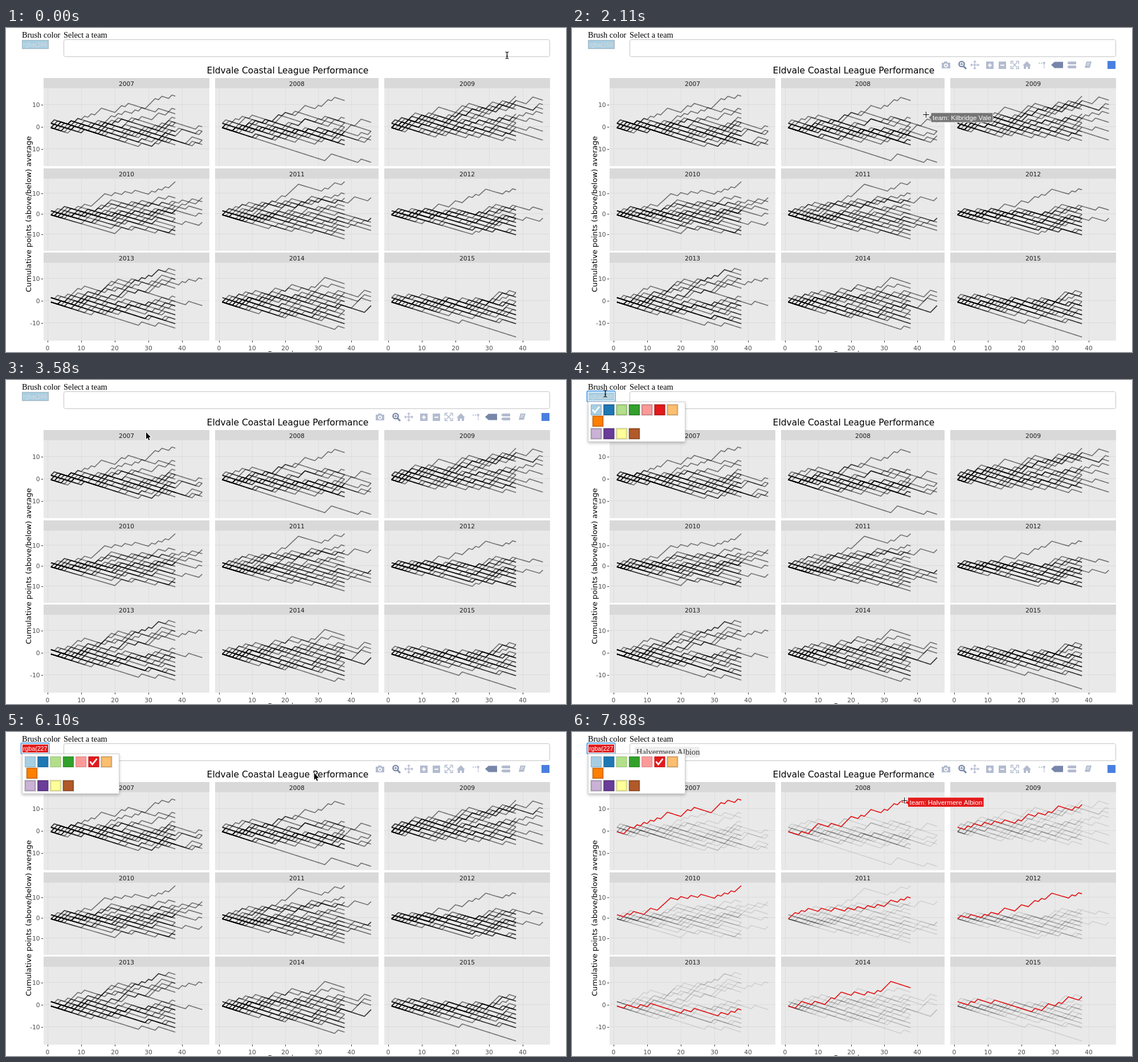
These frames come from a looping animation (983x570 px, 8 s). An HTML page with a canvas:

```html
<!DOCTYPE html>
<html lang="en">
<head>
<meta charset="utf-8">
<title>League performance</title>
<style>
html, body { margin: 0; width: 100%; height: 100%; overflow: hidden; background: #fff; }
canvas { display: block; }
</style>
</head>
<body>
<canvas id="stage" width="983" height="570"></canvas>
<script>
const W = 983, H = 570, LOOP = 8000;
const g = document.getElementById('stage').getContext('2d');
const SANS = '"DejaVu Sans", sans-serif';
const ARIAL = '"Liberation Sans", Arial, sans-serif';
const SERIF = '"Liberation Serif", Times, serif';
const RED = '#e31a1c', CLUB = 'Halvermere Albion';

const cols = [
  { x: 66, w: 291, x0: 73, dx: 5.9 },
  { x: 367, w: 287, x0: 374, dx: 5.8 },
  { x: 664, w: 291, x0: 671, dx: 5.9 }
];
const rows = [
  { y: 88, h: 155, y0: 173.5, dy: 3.9 },
  { y: 247, h: 145, y0: 327, dy: 3.6 },
  { y: 395, h: 155, y0: 480.3, dy: 3.9 }
];

// Rounds won by the brushed club, season by season.
const won = [
  [4, 5, 7, 9, 11, 13, 15, 16, 21, 22, 24, 30, 31, 32, 34, 37],
  [5, 8, 9, 10, 14, 18, 19, 20, 23, 25, 26, 30, 32, 33, 35],
  [1, 4, 6, 9, 12, 15, 19, 21, 22, 25, 28, 30, 31, 36, 38],
  [1, 4, 6, 10, 11, 14, 15, 16, 17, 20, 23, 26, 31, 33, 35, 37, 38],
  [2, 3, 5, 7, 11, 15, 19, 22, 25, 28, 31, 32, 35, 37],
  [2, 5, 9, 11, 14, 15, 19, 20, 23, 24, 26, 28, 29, 35, 37],
  [4, 8, 11, 21, 24, 32, 35, 37],
  [4, 5, 9, 13, 14, 16, 17, 21, 25, 28, 30, 31, 32],
  [1, 5, 7, 12, 24, 27, 28, 31, 33, 34, 38]
];
// Win totals of the other clubs: even spread, extra leaders, 46-round clubs.
const field = [
  { hi: 12, lo: 5, n: 12, top: [13], long: [11, 10, 10, 8, 8, 7] },
  { hi: 11, lo: 5, n: 13, top: [], long: [12, 10, 10, 9, 8] },
  { hi: 14, lo: 6, n: 11, top: [16], long: [17, 16, 15, 14, 12, 10, 8] },
  { hi: 13, lo: 4, n: 14, top: [], long: [15, 14, 12, 11, 9] },
  { hi: 13, lo: 3, n: 12, top: [17], long: [15, 10, 10, 9, 8, 7] },
  { hi: 11, lo: 4, n: 17, top: [], long: [12, 10] },
  { hi: 10, lo: 3, n: 12, top: [16, 15, 14, 14, 12], long: [16, 10] },
  { hi: 11, lo: 3, n: 13, top: [12], long: [13, 12, 11, 10, 10] },
  { hi: 11, lo: 4, n: 17, top: [], long: [] }
];

let seed = 2007;
function rnd() {
  seed = (seed + 0x6D2B79F5) | 0;
  let t = Math.imul(seed ^ (seed >>> 15), 1 | seed);
  t = (t + Math.imul(t ^ (t >>> 7), 61 | t)) ^ t;
  return ((t ^ (t >>> 14)) >>> 0) / 4294967296;
}

// A random season with a fixed number of wins.
function season(total, games) {
  const wins = [];
  for (let i = 1; i <= games; i++) {
    const left = total - wins.length, rest = games - i + 1;
    const drift = total * i / games - wins.length;
    const p = left >= rest ? 1 : left <= 0 ? 0 : left / rest + 0.08 * (drift - 0.4);
    if (rnd() < p) wins.push(i);
  }
  return { wins, games };
}

const panels = field.map((f, i) => {
  const teams = [];
  for (let k = 0; k < f.n; k++) {
    teams.push(season(Math.round(f.hi + (f.lo - f.hi) * Math.pow(k / (f.n - 1), 0.85)), 38));
  }
  f.top.forEach(w => teams.push(season(w, 38)));
  f.long.forEach(w => teams.push(season(w, 46)));
  return { col: cols[i % 3], row: rows[Math.floor(i / 3)], year: 2007 + i, teams, own: { wins: won[i], games: 38 } };
});
panels[1].teams.push({ wins: [33, 34, 43], games: 46 });
panels[8].teams.push({ wins: [22], games: 38 });

function text(c, s, x, y, size, family, color, align) {
  c.font = size + 'px ' + family;
  c.fillStyle = color;
  c.textAlign = align || 'left';
  c.fillText(s, x, y);
}
function box(c, x, y, w, h, color) {
  c.fillStyle = color;
  c.fillRect(x, y, w, h);
}
function line(c, pts, color, width) {
  c.beginPath();
  pts.forEach(p => c.lineTo(p[0], p[1]));
  c.strokeStyle = color;
  c.lineWidth = width;
  c.stroke();
}
function shape(c, pts, color) {
  c.beginPath();
  pts.forEach(p => c.lineTo(p[0], p[1]));
  c.closePath();
  c.fillStyle = color;
  c.fill();
}

function drawTeam(c, p, team, color, width) {
  const pts = [];
  let v = 0;
  for (let i = 1; i <= team.games; i++) {
    v += team.wins.includes(i) ? 1.52 : -0.48;
    pts.push([p.col.x0 + i * p.col.dx, p.row.y0 - v * p.row.dy]);
  }
  line(c, pts, color, width);
}

function drawPanel(c, p, brushed) {
  const { col, row } = p;
  box(c, col.x, row.y, col.w, 18, '#d9d9d9');
  box(c, col.x, row.y + 18, col.w, row.h - 18, '#e9e9e9');
  text(c, p.year, col.x + col.w / 2, row.y + 14, 10.7, SANS, '#1a1a1a', 'center');
  for (let k = 0; k <= 4; k++) {
    const x = Math.round(col.x0 + 10 * k * col.dx);
    box(c, x, row.y + 18, 1, row.h - 18, '#dedede');
  }
  for (const v of [10, 0, -10]) box(c, col.x, Math.round(row.y0 - v * row.dy) - 1, col.w, 1, '#dbdbdb');
  const ink = brushed ? 'rgba(0,0,0,.1)' : 'rgba(0,0,0,.5)';
  p.teams.forEach(t => drawTeam(c, p, t, ink, 1.7));
  drawTeam(c, p, p.own, brushed ? RED : ink, 1.7);
}

function chart(brushed) {
  const cv = document.createElement('canvas');
  cv.width = W;
  cv.height = H;
  const c = cv.getContext('2d');
  c.lineJoin = 'round';
  box(c, 0, 0, W, H, '#fff');
  panels.forEach(p => drawPanel(c, p, brushed));
  rows.forEach(r => [10, 0, -10].forEach(v => {
    const y = r.y0 - v * r.dy;
    text(c, v, 59.5, y + 4, 10.7, SANS, '#4d4d4d', 'right');
    box(c, 62, Math.round(y), 3, 1, '#333');
  }));
  cols.forEach(k => [0, 10, 20, 30, 40].forEach(v => {
    const x = k.x0 + v * k.dx;
    text(c, v, x, 567, 10.7, SANS, '#4d4d4d', 'center');
    box(c, Math.round(x), 550, 1, 3, '#333');
  }));
  text(c, 'Eldvale Coastal League Performance', 494.5, 80, 15.5, SANS, '#000', 'center');
  text(c, 'Game in season', 510.5, 578, 13.1, SANS, '#000', 'center');
  c.save();
  c.translate(44, 327.5);
  c.rotate(-Math.PI / 2);
  text(c, 'Cumulative points (above/below) average', 0, 0, 13.1, SANS, '#000', 'center');
  c.restore();
  text(c, 'Brush color', 28, 17, 14.35, SERIF, '#000');
  text(c, 'Select a team', 101, 17, 14.4, SERIF, '#000');
  return cv;
}
const plain = chart(false), brushed = chart(true);

function drawModebar() {
  const pale = '#b3bbcf', dark = '#7786a8';
  // camera
  box(g, 649, 61, 15, 10, pale);
  box(g, 653, 59, 6, 2, pale);
  ring(656.5, 66, 2.6, '#fff', 1.6);
  // zoom
  ring(684, 63.5, 4.6, dark, 2.4);
  line(g, [[687, 67], [692, 72]], dark, 2.8);
  line(g, [[681.5, 63.5], [686.5, 63.5]], dark, 1.2);
  line(g, [[684, 61], [684, 66]], dark, 1.2);
  // pan
  line(g, [[700, 65], [714, 65]], pale, 1.5);
  line(g, [[707, 58], [707, 72]], pale, 1.5);
  for (let k = 0; k < 4; k++) {
    const a = k * Math.PI / 2, dx = Math.cos(a), dy = Math.sin(a);
    shape(g, [[707 + 8 * dx, 65 + 8 * dy], [707 + 5 * dx - 3 * dy, 65 + 5 * dy + 3 * dx], [707 + 5 * dx + 3 * dy, 65 + 5 * dy - 3 * dx]], pale);
  }
  // zoom in and out
  for (const x of [727, 749]) {
    box(g, x, 59, 13, 13, pale);
    box(g, x + 3, 64.5, 7, 2, '#fff');
  }
  box(g, 732.5, 62, 2, 7, '#fff');
  // autoscale
  line(g, [[772, 60], [782, 70]], pale, 1.5);
  line(g, [[782, 60], [772, 70]], pale, 1.5);
  for (const [x, y, a, b] of [[770.5, 58.5, 1, 1], [784, 58.5, -1, 1], [770.5, 71.5, 1, -1], [784, 71.5, -1, -1]]) {
    line(g, [[x + 5 * a, y], [x, y], [x, y + 5 * b]], pale, 1.5);
  }
  // home
  shape(g, [[791, 66], [798.5, 58.5], [806, 66], [804, 66], [804, 72], [800, 72], [800, 68], [797, 68], [797, 72], [793, 72], [793, 66]], pale);
  // spikes
  for (const x of [819, 823, 827]) box(g, x, 61, 2.5, 1.5, pale);
  for (const y of [64, 68]) box(g, 828, y, 1.5, 2.5, pale);
  g.beginPath();
  g.arc(828.7, 61.5, 2, 0, 7);
  g.fill();
  // hover modes
  shape(g, [[841, 65], [847, 59.5], [862, 59.5], [862, 70.5], [847, 70.5]], dark);
  for (const y of [59, 66]) shape(g, [[869, y + 2.5], [872, y], [885, y], [885, y + 5], [872, y + 5]], pale);
  // book
  shape(g, [[903, 59], [912, 59], [909, 70], [900, 70]], pale);
  line(g, [[904, 62], [909, 62]], '#fff', 1);
  line(g, [[903, 65], [908, 65]], '#fff', 1);
  box(g, 940, 58, 14, 14, '#4a7fe0');
}
function ring(x, y, r, color, width) {
  g.beginPath();
  g.arc(x, y, r, 0, Math.PI * 2);
  g.strokeStyle = color;
  g.lineWidth = width;
  g.stroke();
}

const swatches = ['#a6cee3', '#1f78b4', '#b2df8a', '#33a02c', '#fb9a99', RED, '#fdbf6f', '#ff7f00', '#cab2d6', '#6a3d9a', '#ffff99', '#b15928'];
function drawPicker(active) {
  g.save();
  g.shadowColor = 'rgba(0,0,0,.25)';
  g.shadowBlur = 5;
  g.shadowOffsetY = 2;
  box(g, 28, 38, 171, 71, '#fff');
  g.restore();
  g.strokeStyle = '#d0d0d0';
  g.lineWidth = 1;
  g.strokeRect(28.5, 38.5, 170, 70);
  swatches.forEach((color, i) => {
    const x = i === 7 ? 36 : 33 + 22.3 * (i < 7 ? i : i - 8);
    const y = i < 7 ? 43 : i === 7 ? 63 : 85;
    box(g, x, y, 19, 19, color);
    g.strokeStyle = 'rgba(0,0,0,.15)';
    g.strokeRect(x + 0.5, y + 0.5, 18, 18);
    if (i === active) line(g, [[x + 3, y + 9], [x + 7, y + 14], [x + 15, y + 4]], '#fff', 2.8);
  });
}

function drawInputs(t) {
  const red = t >= 5350, focus = t >= 4320;
  g.beginPath();
  g.roundRect(101.5, 20.5, 853, 30, 3);
  g.fillStyle = '#fff';
  g.fill();
  g.strokeStyle = '#c4c4c4';
  g.lineWidth = 1;
  g.stroke();
  if (t >= 7880) {
    g.beginPath();
    g.roundRect(110, 26, 114, 19, 3);
    g.fillStyle = '#eee';
    g.fill();
    text(g, CLUB, 113, 40, 14.4, SERIF, '#333');
  }
  if (focus) {
    g.beginPath();
    g.roundRect(26.5, 19.5, 49, 19, 2);
    g.strokeStyle = '#6fb0ea';
    g.lineWidth = 2.5;
    g.stroke();
  }
  box(g, 28, 21, 47, 16, '#fff');
  box(g, 29, 22, 45, 14, red ? RED : '#a6cee3');
  if (!focus) {
    g.strokeStyle = '#a9b4bb';
    g.lineWidth = 1;
    g.strokeRect(28.5, 21.5, 46, 15);
  }
  g.save();
  g.beginPath();
  g.rect(29, 21, 44, 16);
  g.clip();
  text(g, red ? 'rgba(227, 26, 28, 1)' : 'rgba(166, 206, 227, 1)', 30, 33, 10.6, ARIAL, red ? '#fff' : '#dcdcd8');
  g.restore();
}

function drawTip(x, y, name, color) {
  const s = 'team: ' + name;
  g.font = '11.6px ' + ARIAL;
  const r = x + 10 + g.measureText(s).width;
  const pts = [[x, y], [x + 4, y - 4], [x + 4, y - 8.5], [r, y - 8.5], [r, y + 8.5], [x + 4, y + 8.5], [x + 4, y + 4], [x, y]];
  shape(g, pts, color);
  line(g, pts, '#fff', 0.8);
  text(g, s, x + 7, y + 4, 11.6, ARIAL, '#fff');
}

// Pointer path: time, x, y
const path = [
  [150, 879, 48], [760, 735, 80], [1220, 605, 114], [1370, 601, 122], [1670, 601, 122],
  [1960, 616, 143], [2110, 621, 152], [2410, 628, 172], [2860, 634, 218], [3880, 98, 50],
  [4030, 58, 24], [4470, 58, 24], [5200, 150, 51], [5500, 153, 52], [5650, 153, 52],
  [6100, 540, 76], [6840, 592, 112], [7140, 583, 120]
];
function pointerAt(t) {
  const i = path.findIndex(p => p[0] > t);
  if (i === 0) return path[0].slice(1);
  if (i < 0) return path[path.length - 1].slice(1);
  const a = path[i - 1], b = path[i], k = (t - a[0]) / (b[0] - a[0]);
  return [a[1] + (b[1] - a[1]) * k, a[2] + (b[2] - a[2]) * k];
}
function tick(t) {
  if (t < 300) return 0;
  if (t < 2840) return 300 + Math.floor((t - 300) / 150.6) * 150.6;
  return 2860 + Math.floor((t - 2840) / 147.6) * 147.6;
}

function drawPointer(x, y, picker) {
  x = Math.round(x);
  y = Math.round(y);
  const overPlot = panels.some(p => x > p.col.x && x < p.col.x + p.col.w && y > p.row.y + 18 && y < p.row.y + p.row.h);
  const overText = y < 51 && (x > 101 || y < 38) && !(picker && x < 199 && y > 38);
  if (overPlot) {
    line(g, [[x - 6, y + 0.5], [x + 7, y + 0.5]], '#fff', 3);
    line(g, [[x + 0.5, y - 6], [x + 0.5, y + 7]], '#fff', 3);
    box(g, x - 5, y, 11, 1, '#000');
    box(g, x, y - 5, 1, 11, '#000');
  } else if (overText) {
    line(g, [[x - 2.5, y - 6], [x + 0.5, y - 5], [x + 0.5, y + 5], [x - 2.5, y + 6]], '#111', 1.2);
    line(g, [[x + 3.5, y - 6], [x + 0.5, y - 5], [x + 0.5, y + 5], [x + 3.5, y + 6]], '#111', 1.2);
    box(g, x - 1, y + 1, 3, 1, '#111');
  } else {
    const pts = [[0, -4], [0, 8], [2.7, 5.6], [4.6, 10], [6.4, 9.2], [4.6, 5], [8, 4.6], [0, -4]].map(p => [x + p[0], y + p[1]]);
    line(g, pts, '#fff', 2);
    shape(g, pts, '#000');
  }
}

function draw(t) {
  const picked = t >= 7880, picker = t >= 4320;
  g.drawImage(picked ? brushed : plain, 0, 0);
  drawInputs(t);
  if ((t >= 750 && t < 4020) || (t >= 5930 && t < 7560) || picked) drawModebar();
  if (picker) drawPicker(t >= 5350 ? 5 : 0);
  const gray = '#757575';
  if (t >= 1950 && t < 2255) drawTip(626, 157.5, 'Kilbridge Vale', gray);
  else if (t >= 2255 && t < 2400) drawTip(631, 160, 'Kilbridge Vale', gray);
  else if (t >= 2840 && t < 2990) drawTip(632, 229.5, 'Brandlemoor', gray);
  else if (t >= 7270) drawTip(585.5, 123.5, CLUB, picked ? RED : gray);
  const [x, y] = pointerAt(tick(t));
  drawPointer(x, y, picker);
}

const start = performance.now();
function frame() {
  draw((performance.now() - start) % LOOP);
  requestAnimationFrame(frame);
}
frame();
</script>
</body>
</html>
```
